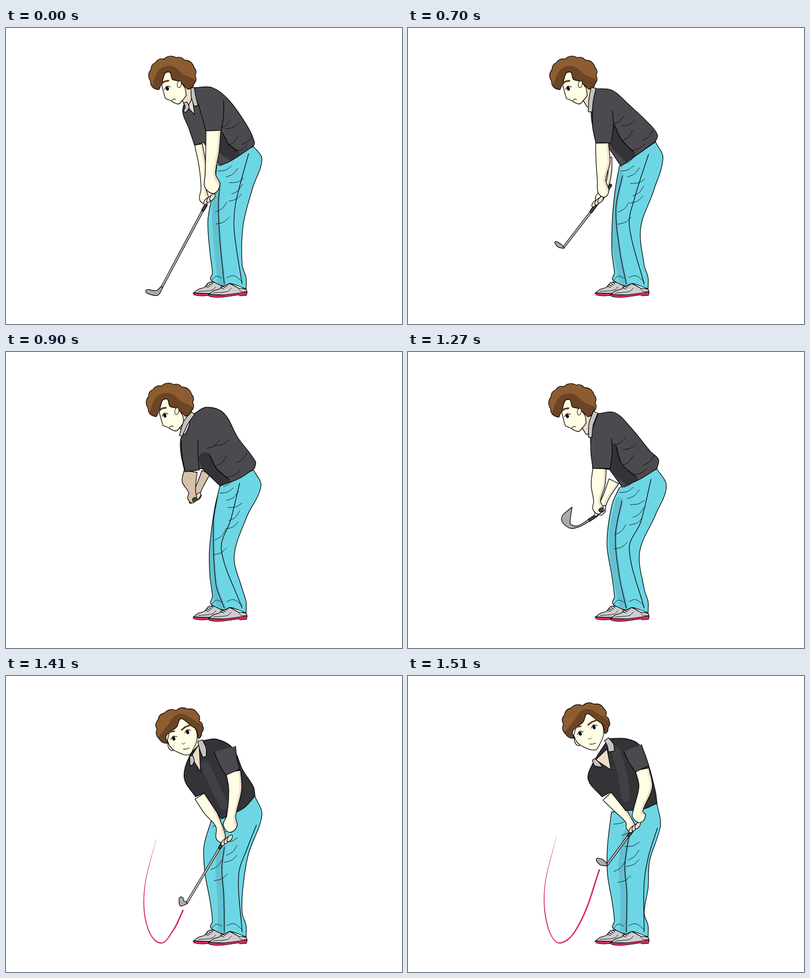
These frames come from a looping animation (800 by 600 pixels, 3040 ms). An HTML page:

```html
<!DOCTYPE html>
<html lang="en">
<head>
<meta charset="utf-8">
<title>Golf swing</title>
<style>
html, body { margin: 0; width: 100%; height: 100%; overflow: hidden; background: #fff; }
svg { display: block; width: 800px; height: 600px; stroke-linecap: round; stroke-linejoin: round; }
</style>
</head>
<body>
<svg id="stage" viewBox="0 0 800 600"></svg>
<script>
const SKIN = '#fffde3', TAN = '#eddcc8', HAIR = '#8d5d31', HAIR_DARK = '#6a4526', BROW = '#60391f';
const SHIRT = '#4b4a4f', SHIRT_MID = '#414045', SHIRT_DARK = '#343337';
const PANTS = '#6dd6e4', PANTS_DARK = '#62c0d1', GREY = '#c4c3c4', SHOE = '#cfcdcf', STEEL = '#aaa9ab';
const RED = '#d82b60', GRIP = '#444';
let clips = 0;

// "x,y" or "x,y,width"; a trailing "!" marks a corner.
const parse = text => text.trim().split(/\s+/).map(item => {
  const [x, y, w] = item.split(',').map(parseFloat);
  return { x, y, w, corner: item.endsWith('!') };
});
const points = p => typeof p === 'string' ? parse(p) : p;
const lerp = (a, b, t) => a + (b - a) * t;
const lerpPoint = (a, b, t) => ({ x: lerp(a.x, b.x, t), y: lerp(a.y, b.y, t) });

// Smooth path whose handles follow the chord between neighbours.
function curve(source, closed) {
  const pts = [...points(source)];
  if (closed) pts.push(pts[0]);
  const handle = (i, other, sign) => {
    const p = pts[i], q = pts[other], len = Math.hypot(q.x - p.x, q.y - p.y) / 3;
    const smooth = i > 0 && i < pts.length - 1 && !p.corner;
    const a = pts[smooth ? i - 1 : Math.min(i, other)], b = pts[smooth ? i + 1 : Math.max(i, other)];
    const k = sign * len / (Math.hypot(b.x - a.x, b.y - a.y) || 1);
    return `${p.x + (b.x - a.x) * k},${p.y + (b.y - a.y) * k}`;
  };
  return `M${pts[0].x},${pts[0].y}` + pts.slice(1).map((q, i) =>
    `C${handle(i, i + 1, 1)} ${handle(i + 1, i, -1)} ${q.x},${q.y}`).join('');
}

// Outline of a band with a varying width around a spine.
function band(source, round) {
  const spine = points(source), last = spine.length - 1;
  const side = sign => spine.map((p, i) => {
    const a = spine[Math.max(i - 1, 0)], b = spine[Math.min(i + 1, last)];
    const k = sign * p.w / 2 / (Math.hypot(b.x - a.x, b.y - a.y) || 1);
    return { x: p.x - (b.y - a.y) * k, y: p.y + (b.x - a.x) * k, corner: i === 0 || i === last && !round };
  });
  const end = spine[last], before = spine[last - 1];
  const reach = end.w / 2 / (Math.hypot(end.x - before.x, end.y - before.y) || 1);
  const tip = { x: lerp(end.x, before.x, -reach), y: lerp(end.y, before.y, -reach) };
  return [...side(1), ...(round ? [tip] : []), ...side(-1).reverse()];
}

const fill = (color, pts) => `<path d="${curve(pts, true)}" fill="${color}"/>`;
const line = (pts, width = .9, color = '#000') =>
  `<path d="${curve(pts)}" fill="none" stroke="${color}" stroke-width="${width}"/>`;
const shape = (color, pts, width = 1.3) =>
  `<path d="${curve(pts, true)}" fill="${color}" stroke="#000" stroke-width="${width}"/>`;
const oval = (x, y, rx, ry, turn, color, width = 1) => `<ellipse rx="${rx}" ry="${ry}" fill="${color}"
  stroke="#000" stroke-width="${width}" transform="translate(${x} ${y}) rotate(${turn})"/>`;
const move = (dx, dy, art) => `<g transform="translate(${dx} ${dy})">${art}</g>`;

// A filled path with art kept inside it, outlined on top.
function inked(color, d, inside) {
  const id = 'clip' + clips++;
  return `<clipPath id="${id}"><path d="${d}"/></clipPath><path d="${d}" fill="${color}"/>
    <g clip-path="url(#${id})">${inside}</g><path d="${d}z" fill="none" stroke="#000" stroke-width="1.3"/>`;
}

// Short seeded creases scattered between two edges.
function wrinkles(edgeA, edgeB, count, seed) {
  const random = () => (seed = seed * 16807 % 2147483647) / 2147483647;
  const along = (pts, t) => {
    const at = t * (pts.length - 1), i = Math.floor(at);
    return lerpPoint(pts[i], pts[i + 1], at - i);
  };
  let art = '';
  for (let i = 0; i < count; i++) {
    const t = (i + random()) / count, p = lerpPoint(along(edgeA, t), along(edgeB, t), lerp(.2, .8, random()));
    const angle = -.8 + random() * .5, dx = Math.cos(angle) * 15, dy = Math.sin(angle) * 15;
    art += line([{ x: p.x - dx, y: p.y - dy }, { x: p.x + 2, y: p.y + 3 }, { x: p.x + dx, y: p.y + dy }]);
  }
  return art;
}

function shoe() {
  let laces = '';
  for (let i = 0; i < 4; i++) laces += line(`${434 + i * 4},${526 - i * 2.5} ${441 + i * 3},${529 - i * 2.5}`, 1.2);
  return shape(SHOE, '411,540! 420,533 434,528 441,519 455,519 470,527 486,530 488,537! 455,541') +
    shape(RED, '410,540! 440,541 488,535! 487,542! 473,543! 471,541! 432,546 412,544', 1) +
    line('420,537 449,534 456,527') + line('470,527 476,534 487,534') + laces;
}
const shoes = move(-32, -3, shoe()) + move(-1, 0, shoe());

function trousers({ left, right, crease, seam }) {
  const a = parse(left), b = parse(right);
  const hem = parse('477,480 485,506 485,529! 470,523 452,518 440,523 424,517 413,509 417,497 412,455');
  const front = crease + ' 441,519', side = seam + ' 477,519';
  return inked(PANTS, curve([...b, ...hem, ...a.reverse()], true),
    move(-5, 0, line(front, 16, PANTS_DARK)) + wrinkles(parse(left), b, 8, 77) +
    line(front, 1.3) + line(side, 1.3) + line('415,512 425,503 436,507') + line('446,506 460,502 477,514'));
}

function shirt({ back, front, fold, facing }) {
  const folds = facing ? line(fold, 18, SHIRT_MID)
    : move(-9, 8, line(fold, 26, SHIRT_DARK)) + line(fold, 1.3) + wrinkles(parse(fold), parse(back).slice(2, 5), 5, 31);
  return inked(facing ? SHIRT_DARK : SHIRT, curve(back + ' ' + front, true), folds);
}

function arm(spine, color = SKIN) {
  const outline = band(spine, true), lit = outline.slice(Math.ceil(outline.length / 2));
  return inked(color, curve(outline, true), line(lit, 9, color === SKIN ? TAN : color));
}

function sleeve(spine) {
  const outline = band(spine);
  return fill(SHIRT, outline) + line(outline, 1.3);
}

function club([butt, end, head]) {
  const grip = `${butt} ${end}`, shaft = `${end} ${head.split(' ')[0]}`;
  return line(shaft, 4.8) + line(shaft, 2.6, GREY) + line(grip, 6.5) + line(grip, 4, GRIP) +
    shape(STEEL, band(head, true));
}

function fingers(at) {
  const [{ x, y }] = parse(at);
  return [-1, 0, 1].map(i => oval(x + i * 6, y - i * 4, 4, 8, 35, TAN, 1.2)).join('');
}

// Hair: a lobe over each gap between the crown points, closed along the hairline.
function hair(crown, hairline, shade) {
  const pts = parse(crown);
  const lobes = pts.slice(1).map((q, i) => {
    const p = pts[i], x = (p.x + q.x) / 2 + (q.y - p.y) * .36, y = (p.y + q.y) / 2 - (q.x - p.x) * .36;
    return `Q${x},${y} ${q.x},${q.y}`;
  });
  const edge = curve([pts[pts.length - 1], ...parse(hairline), pts[0]]);
  return inked(HAIR, `M${pts[0].x},${pts[0].y}${lobes.join('')}${edge.slice(edge.indexOf('C'))}`, line(shade, 22, HAIR_DARK));
}
const eye = (x, y, tilt) => `<g transform="translate(${x} ${y}) rotate(${tilt})">` +
  fill('#fff', '-6,0! 0,-5 7,-2! 4,4 -3,4') + line('-6,0 0,-5 7,-2', 1.2) + oval(0, 0, 3, 4, 0, '#000', 0) + '</g>';

const profileHead = shape(TAN, '347,120! 374,121 367,160 357,149!') +
  shape(SKIN, '322,90! 314,108 318,129 322,143! 330,146 348,154 357,146 364,137! 361,121 336,90') +
  hair('303,124 292,108 293,84 302,70 319,63 344,60 360,65 380,80 382,96 380,113 367,124',
    '356,114 346,107 336,104 331,90 322,91 316,108 309,125!', '305,123 316,94 333,88 351,102 372,112') +
  oval(350, 114, 4, 7, 10, SKIN) + line('313,115 319,109 328,107', 3.5, BROW) + eye(326, 123, -15) +
  line('335,147 339,144 343,145', 1.2);

const frontHead = oval(333, 143, 5, 9, -25, SKIN, 1.3) + oval(386, 117, 4, 9, 10, SKIN, 1.3) +
  shape(SKIN, '326,130! 331,142 342,152 369,160 379,147 386,128 382,106 352,84 331,114') +
  hair('327,136 309,127 305,108 307,89 320,75 344,70 367,67 387,76 390,92 397,100 395,115 389,127',
    '384,108 374,101 358,88 351,88 345,103 329,115 323,124', '318,128 336,106 351,88 370,96 394,112') +
  line('328,116 333,113 340,112', 3.2, BROW) + line('355,109 363,103 371,100', 3.2, BROW) +
  eye(339, 127, -15) + eye(367, 114, -15) + line('355,136 358,138 362,135') + line('358,148 364,148 370,146', 1.2);

function person(pose) {
  return shoes + trousers(pose) + arm(pose.farArm, pose.skin) + club(pose.club) + fingers(pose.fingers) +
    shirt(pose) + arm(pose.nearArm, pose.skin) + sleeve(pose.sleeve) +
    (pose.neck ? shape(TAN, pose.neck) : '') + move(...pose.head, pose.facing ? frontHead : profileHead) +
    pose.collars.map(c => shape(GREY, band(c))).join('') +
    (pose.cap ? oval(...pose.cap, 5, 4, -35, GRIP) : '') + (pose.trail ? fill(RED, band(pose.trail)) : '');
}

const address = {
  head: [0, 0], neck: '360,152! 374,124! 381,176!', collars: ['362,151,7 366,160,8 361,170,6', '377,121,7 379,140,9 384,158,8'],
  left: '426,278! 420,325 408,388', right: '500,240! 517,266 498,325 479,400',
  crease: '432,315 429,360 432,430', seam: '490,255 464,355 461,410',
  back: '378,121! 417,121 451,147 490,203 502,232 500,239!', front: '455,269 432,279! 399,232! 381,238! 370,205 357,165',
  fold: '437,212 450,236 468,249', sleeve: '414,150,52 418,180,43 419,208,31',
  nearArm: '419,206,30 417,250,27 413,296,21 417,320,31', farArm: '389,236,16 397,280,14 399,325,10 400,347,18',
  fingers: '411,347', club: ['404,359', '398,369', '315,525,4 305,537,10 286,534,8']
};
const takeaway = {
  head: [-2, 0], collars: ['375,121,10 370,145,9 368,170,8'],
  left: '427,280! 419,325 413,385', right: '500,231! 515,264 495,333 470,405',
  crease: '433,300 420,367 428,453', seam: '486,256 457,347 447,400',
  back: '378,123! 412,126 445,154 490,197 504,217 500,230!', front: '470,252 430,280! 407,245! 380,233! 374,205 370,172',
  fold: '417,197 430,225 456,252', sleeve: '393,168,40 394,200,42 395,233,31',
  nearArm: '392,233,26 394,272,28 391,308,17 395,332,22', farArm: '407,262,10 408,290,7 402,318,8 386,346,16',
  fingers: '383,352', club: ['409,319', '370,372', '314,445,3 306,441,8 299,435,5']
};
const top_ = {
  head: [-5, 6], collars: ['378,124,8 364,142,10 353,170,6'], skin: '#d7c0a8', cap: [381, 299],
  left: '432,272! 421,320 411,402', right: '500,239! 515,272 486,335 461,414',
  crease: '427,293 419,345 424,470', seam: '472,266 454,340 435,400',
  back: '380,125! 405,112 440,124 468,173 504,222 502,236!', front: '470,257 432,271! 396,236! 361,242! 353,203 354,173',
  fold: '411,208 425,236 450,258', sleeve: '371,178,34 372,210,32 376,241,29',
  nearArm: '373,242,27 370,262,28 376,284,14 376,297,18', farArm: '404,244,18 393,268,14 386,284,14 386,292,17',
  fingers: '382,296', club: ['381,299', '381,298', '381,298,1 381,297,1 381,296,1']
};
const downswing = {
  head: [-4, 7], collars: ['379,122,10 370,146,9 368,173,7'], cap: [390, 320],
  left: '427,275! 412,310 402,388', right: '503,237! 522,272 500,330 468,405',
  crease: '432,302 419,372 427,455', seam: '491,258 470,345 447,398',
  back: '384,125! 418,123 450,153 490,202 506,218 503,236!', front: '470,257 433,274! 407,238! 373,235! 372,208 369,170',
  fold: '420,190 431,226 461,253', sleeve: '390,176,42 391,205,43 391,236,35',
  nearArm: '387,236,27 384,270,28 382,302,14 384,318,21', farArm: '416,262,22 402,290,14 392,312,14 389,322,18',
  fingers: '388,322', club: ['381,331', '366,341', '366,341,4 345,353,3 327,353,8 319,338,18 331,315,1']
};
const followThrough = {
  facing: true, head: [0, 0], neck: '374,164! 390,138! 393,194!', collars: ['374,162,6 376,171,9 374,181,5', '392,131,10 398,148,13 401,164,7'],
  left: '415,292! 400,345 402,400', right: '503,244! 517,282 490,360 479,425',
  crease: '441,347 436,391 440,448', seam: '506,302 489,345 470,403',
  back: '398,131! 425,128 458,146 478,190 500,225 503,243!', front: '480,268 435,290! 400,237! 383,245! 360,207 371,162',
  fold: '403,182 421,222 440,262', sleeve: '442,148,45 449,174,37 458,195,31',
  nearArm: '459,193,30 463,230,26 455,284,18 453,303,28', farArm: '392,243,24 411,272,24 430,303,13 434,328,19',
  fingers: '446,333', club: ['436,341', '432,348', '365,460,4 356,461,12 354,452,9'],
  trail: '303,331,.4 280,430,1.5 284,503,2 311,541,2.5 338,515,2.8 358,474,3'
};
const finish = {
  facing: true, head: [9, -10], neck: '379,170! 402,148! 410,190!', collars: ['375,169,6 381,178,11 391,183,3', '401,128,10 409,140,13 411,153,12'],
  left: '411,276! 403,345 403,402', right: '503,259! 510,303 488,375 485,430',
  crease: '447,320 438,385 442,440', seam: '504,308 486,365 477,420',
  back: '405,127! 440,127 468,140 486,181 500,235 503,258!', front: '475,270 440,273! 410,235! 392,245! 364,210 373,178',
  fold: '420,152 433,200 440,245', sleeve: '454,146,38 463,168,36 473,188,30',
  nearArm: '473,189,28 480,225,27 465,272,19 467,284,27', farArm: '403,243,25 425,266,23 446,293,14 450,307,18',
  fingers: '458,307', club: ['452,315', '446,323', '402,383,4 392,378,12 384,373,8'],
  trail: '300,325,.4 276,430,1.4 283,510,2 309,541,2.5 350,495,2.8 387,392,3'
};

// The pose halfway between two others.
function between(a, b) {
  if (typeof a === 'number') return (a + b) / 2;
  if (Array.isArray(a)) return a.map((v, i) => between(v, b[i]));
  if (typeof a === 'string') {
    const other = b.match(/[\d.]+/g);
    return a.replace(/[\d.]+/g, v => (+v + +other.shift()) / 2);
  }
  return Object.fromEntries(Object.keys(a).map(key => [key, between(a[key], b[key])]));
}
const impact = { ...address, trail: '303,331,.4 279,430,1.5 290,527,2' };

const LOOP = 3040;
const scenes = [[0, address], [700, takeaway], [800, between(takeaway, top_)], [900, top_], [1270, downswing],
  [1340, impact], [1410, followThrough], [1510, finish]].map(([start, pose]) => ({ start, art: person(pose) }));
const stage = document.getElementById('stage');
let shown;

function draw() {
  const time = performance.now() % LOOP;
  const { art } = scenes.findLast(({ start }) => start <= time);
  if (art !== shown) stage.innerHTML = shown = art;
  requestAnimationFrame(draw);
}
draw();
</script>
</body>
</html>
```
